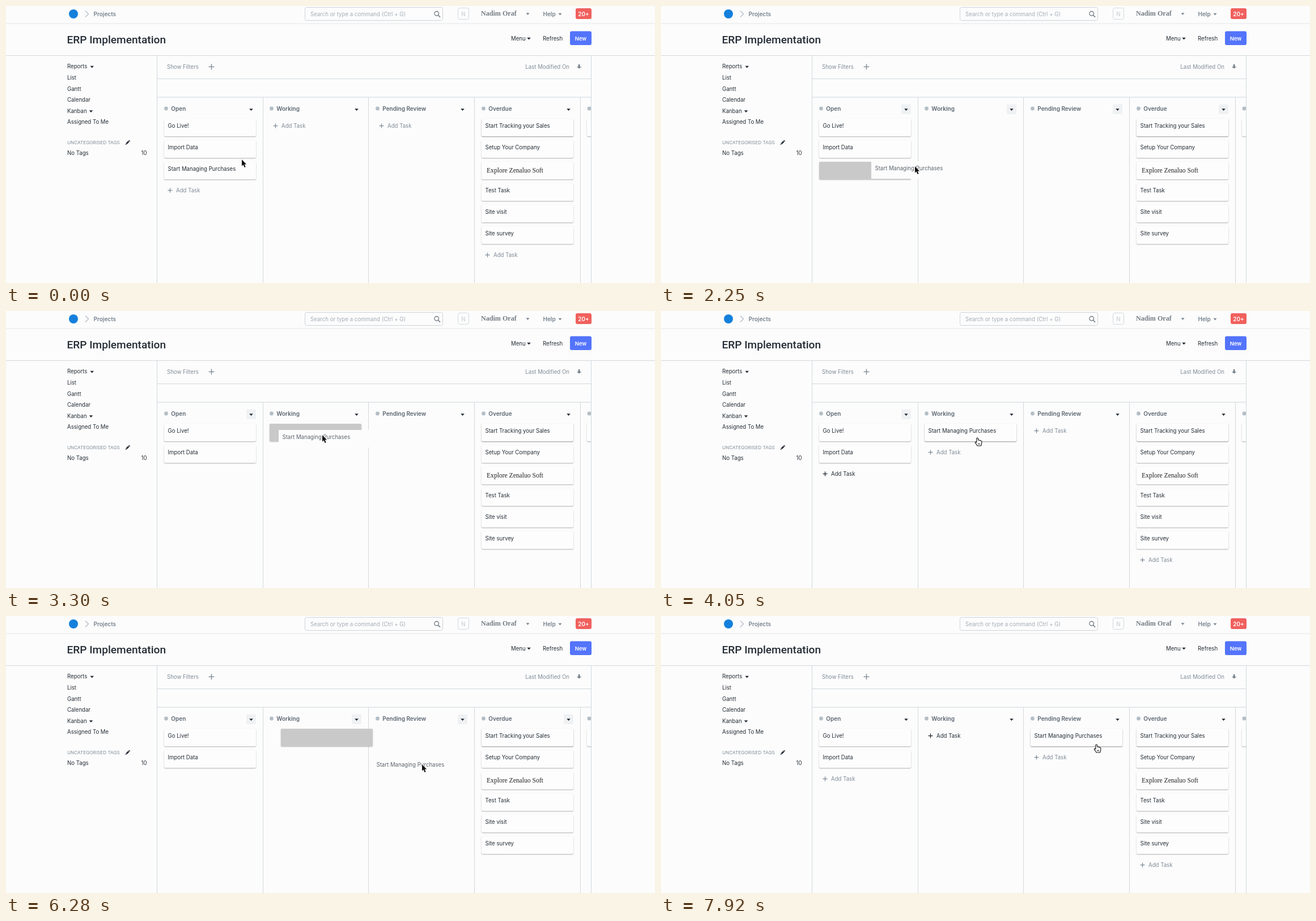
Recreate the animation shown at these times as an HTML page with a canvas. Size 1145 by 489 pixels, loop 8 s.

```html
<!DOCTYPE html>
<html lang="en">
<head>
<meta charset="utf-8">
<title>Kanban board</title>
<style>
  html, body { margin: 0; width: 100%; height: 100%; overflow: hidden; background: #fcfcfc; }
  canvas { display: block; width: 100vw; height: 100vh; }
</style>
</head>
<body>
<canvas id="stage"></canvas>
<script>
const W = 1145, H = 489, LOOP = 8000, STEP = 150;
const canvas = document.getElementById('stage');
const ctx = canvas.getContext('2d');
const scale = window.devicePixelRatio || 1;
canvas.width = Math.round(W * scale);
canvas.height = Math.round(H * scale);

const SANS = 'Inter, "Liberation Sans", sans-serif';
const SERIF = '"Liberation Serif", "Times New Roman", serif';
const BODY = `400 9.65px ${SANS}`;
const BOLD = `600 10px ${SANS}`;
const BG = '#fcfcfc', INK = '#242c35', MUTED = '#808c98', LINE = '#d1d8dd', HEAD = '#5a6570';

const CARD_W = 162, CARD_H = 31, COL_X = 278.8, COL_GAP = 186.6, ROW_Y = 199, ROW_GAP = 38;
const MOVED = 'Start Managing Purchases';
const COLUMNS = [
  { name: 'Open', cards: ['Go Live!', 'Import Data'] },
  { name: 'Working', cards: [] },
  { name: 'Pending Review', cards: [] },
  { name: 'Overdue', cards: ['Start Tracking your Sales', 'Setup Your Company', 'Explore Zenaluo Soft',
                             'Test Task', 'Site visit', 'Site survey'] }
];

// Screen updates come in bursts: [start, count]
const BURSTS = [[0, 1], [150, 4], [1200, 4], [1950, 7], [3000, 4], [4050, 4],
                [5090, 4], [5830, 7], [6880, 1], [7330, 1], [7920, 1]];

// Pointer way points: [time, x, y]
const PATH = [
  [0, 416, 271], [600, 376, 286], [1050, 376, 286], [1650, 355, 287], [1800, 355, 285],
  [2550, 498, 282], [2850, 538, 264], [3300, 558, 219], [3450, 558, 211], [3900, 558, 211],
  [4500, 557, 294], [4950, 557, 294], [5090, 557, 293], [5540, 553, 211], [5680, 553, 211],
  [6280, 734, 262], [6730, 720, 208], [7180, 720, 208], [7330, 718, 242],
  [7770, 718, 242], [7920, 768, 227]
];

const DRAGS = [
  { start: 1950, end: 3450, slide: 2380, from: [0, 2], to: [1, 0], dx: -77, dy: -9 },
  { start: 5830, end: 6880, slide: 6264, from: [1, 0], to: [2, 0], dx: -87, dy: -12 }
];

const clamp = v => Math.max(0, Math.min(1, v));
const mix = (a, b, k) => a + (b - a) * k;
const within = (t, a, b) => t >= a && t < b;
const colX = c => Math.round(COL_X + c * COL_GAP);
const rowY = r => ROW_Y + r * ROW_GAP;

function shownTime(t) {
  let shown = 0;
  for (const [start, count] of BURSTS) {
    if (t < start) break;
    shown = start + Math.min(count - 1, Math.floor((t - start) / STEP)) * STEP;
  }
  return shown;
}

function pointerAt(t) {
  for (let i = 1; i < PATH.length; i++) {
    const [t0, x0, y0] = PATH[i - 1], [t1, x1, y1] = PATH[i];
    if (t <= t1) {
      const k = clamp((t - t0) / (t1 - t0)), e = k * k * (3 - 2 * k);
      return [Math.round(mix(x0, x1, e)), Math.round(mix(y0, y1, e))];
    }
  }
  return PATH[PATH.length - 1].slice(1);
}

// Text is placed by the middle of its capitals, on a whole-pixel baseline
function text(str, x, y, color = INK, font = BODY, align = 'left') {
  ctx.font = font;
  ctx.fillStyle = color;
  ctx.textAlign = align;
  ctx.fillText(str, x, Math.round(y + 3.5));
}

function rect(x, y, w, h, color) {
  ctx.fillStyle = color;
  ctx.fillRect(x, y, w, h);
}

function box(x, y, w, h, r, fill, stroke) {
  ctx.beginPath();
  ctx.roundRect(x, y, w, h, r);
  if (fill) { ctx.fillStyle = fill; ctx.fill(); }
  if (stroke) { ctx.strokeStyle = stroke; ctx.lineWidth = 1; ctx.stroke(); }
}

function raisedBox(x, y, fill, shade) {
  ctx.save();
  ctx.shadowColor = `rgba(0,0,0,${shade})`;
  ctx.shadowBlur = 2 * scale;
  ctx.shadowOffsetY = scale;
  box(x, y, CARD_W, CARD_H, 2, fill);
  ctx.restore();
}

function dot(x, y, r, color) {
  ctx.fillStyle = color;
  ctx.beginPath();
  ctx.arc(x, y, r, 0, Math.PI * 2);
  ctx.fill();
}

function line(points, color, width) {
  ctx.strokeStyle = color;
  ctx.lineWidth = width;
  ctx.beginPath();
  points.forEach(([x, y]) => ctx.lineTo(x, y));
  ctx.stroke();
}

function caret(x, y, color = INK, half = 3.3) {
  ctx.fillStyle = color;
  ctx.beginPath();
  ctx.moveTo(x - half, y - 1.7);
  ctx.lineTo(x + half, y - 1.7);
  ctx.lineTo(x, y + 1.9);
  ctx.fill();
}

function plus(x, y, half, color, width) {
  line([[x - half, y], [x + half, y]], color, width);
  line([[x, y - half], [x, y + half]], color, width);
}

function card(x, y, label, hover) {
  raisedBox(x, y, '#fdfdfd', hover ? 0.42 : 0.3);
  if (!label) return;
  if (label.startsWith('Explore')) text(label, x + 9, y + 15, '#222', `11.6px ${SERIF}`);
  else text(label, x + 6.5, y + 12.5);
}

function addTask(col, row, dark) {
  const x = colX(col), y = rowY(row) + 12.5, color = dark ? INK : MUTED;
  plus(x + 10.5, y, 4, color, 1.3);
  text('Add Task', x + 21, y, color);
}

function navbar() {
  rect(0, 30.5, W, 1, '#e4e8eb');
  dot(119, 14, 8, '#1580dc');
  line([[140, 8.5], [145.5, 14], [140, 19.5]], '#b4bec8', 1.4);
  text('Projects', 154.5, 14.5, '#75818d', BOLD);

  box(527.5, 2.5, 243, 23, 3, null, '#cdd4d9');
  text('Search or type a command (Ctrl + G)', 537, 14.5, '#a3adb7');
  ctx.strokeStyle = '#6c7680';
  ctx.lineWidth = 1.3;
  ctx.beginPath();
  ctx.arc(759.7, 13.3, 3.8, 0, Math.PI * 2);
  ctx.stroke();
  line([[762.5, 16.2], [766, 19.8]], '#6c7680', 1.6);

  box(797.5, 3.5, 19, 20, 3, null, '#d1d8dd');
  text('N', 807, 14, '#c0c9d0', BODY, 'center');
  text('Nadim Oraf', 838, 13.5, '#757c84', `700 12.1px ${SERIF}`);
  caret(920.5, 14, '#7b8794', 3);
  text('Help', 947.5, 14, '#75818d', BOLD);
  caret(977.5, 14.5, '#7b8794', 3);
  box(1005, 4, 28, 19, 3, '#f0605d');
  text('20+', 1019, 14, '#fff', BOLD, 'center');
}

function pageHead() {
  ctx.font = '500 19.1px Roboto, "Liberation Sans", sans-serif';
  ctx.fillStyle = INK;
  ctx.textAlign = 'left';
  ctx.fillText('ERP Implementation', 107.5, 66);
  text('Menu', 891, 57);
  caret(922.5, 57.5);
  text('Refresh', 947, 57);
  box(995, 44.5, 38, 24.5, 3, '#5374fb');
  text('New', 1014, 57, '#fff', `600 9.5px ${SANS}`, 'center');
  rect(0, 87, W, 1, LINE);
}

function sidebar() {
  ['Reports', 'List', 'Gantt', 'Calendar', 'Kanban', 'Assigned To Me']
    .forEach((label, i) => text(label, 108, 106.9 + i * 19.6));
  caret(151.7, 107.5);
  caret(150, 186);
  text('UNCATEGORISED TAGS', 108, 240.7, MUTED, `400 8.2px ${SANS}`);
  line([[212.6, 243], [216.6, 239]], INK, 2.8);
  line([[217.1, 238.5], [218.2, 237.4]], INK, 2.8);
  line([[211, 244.6], [212.3, 243.3]], INK, 1.5);
  text('No Tags', 108, 259.5);
  text('10', 248.5, 259.5, INK, BODY, 'right');
}

function boardFrame() {
  rect(266, 87, 1, H, LINE);
  rect(1032, 87, 1, H, LINE);
  rect(267, 128, 765, 1, LINE);
  rect(267, 160.5, 765, 1, LINE);
  for (let c = 1; c < 5; c++) rect(Math.round(266.2 + c * COL_GAP), 161, 1, H, LINE);

  text('Show Filters', 284, 107.5, MUTED);
  plus(362.5, 107.3, 5, MUTED, 1.4);
  text('Last Modified On', 994, 107.5, MUTED, BODY, 'right');
  rect(1009.7, 103, 2.8, 4.5, '#76818d');
  caret(1011.1, 108.7, '#76818d', 4.2);
}

function board(t, [px, py]) {
  const drag = DRAGS.find(d => within(t, d.start, d.end));
  const allLit = within(t, 1950, 3000) || within(t, 5830, 6880);
  const home = t < 3450 ? [0, 2] : t < 6880 ? [1, 0] : [2, 0];

  COLUMNS.forEach(({ name, cards }, c) => {
    const x = colX(c);
    dot(x + 3.5, 181, 3.4, '#b4bec6');
    text(name, x + 12.3, 181, HEAD, BOLD);
    if (allLit || (c === 0 && within(t, 1950, 6880))) box(x + 145, 173.5, 17, 17.5, 2, '#eff1f3');
    caret(x + 153.5, 183);
    cards.forEach((label, r) => card(x, rowY(r), label, c === 3 && r === 0));
    const dark = (c === 0 && within(t, 3450, 7330)) || (c === 1 && t >= 6880);
    if (!drag) addTask(c, cards.length + (home[0] === c ? 1 : 0), dark);
  });

  ctx.save();
  ctx.beginPath();
  ctx.rect(1014, 161, 18, H);
  ctx.clip();
  dot(colX(4) + 4, 181, 3.4, '#b4bec6');
  card(colX(4), rowY(0));
  ctx.restore();

  if (drag) {
    const k = clamp((t - drag.slide) / STEP);
    const x = mix(colX(drag.from[0]), colX(drag.to[0]), k);
    const y = mix(rowY(drag.from[1]), rowY(drag.to[1]), k);
    raisedBox(x, y, '#c9c9c9', 0.25);
    const gx = px + drag.dx, gy = py + drag.dy;
    rect(gx, gy, CARD_W, CARD_H, BG);
    text(MOVED, gx + 6.5, gy + 12.5, '#5d646c');
    return false;
  }
  const x = colX(home[0]), y = rowY(home[1]);
  const hover = px >= x && px <= x + CARD_W && py >= y && py <= y + CARD_H;
  card(x, y, MOVED, hover);
  return hover;
}

const ARROW = new Path2D('M0 0V11.6L2.6 9.2 4.7 14 6.7 13.1 4.6 8.5H8.2Z');
const HAND = new Path2D('M-1.2 .8Q.2 -.8 1.5 .8V4Q3 3.2 4 4.5 5.5 4 6.3 5.2 8 5 8 7L7.5 10.5 6.5 14H0' +
  'Q-1 11.5 -3.5 8.8 -4 6.8 -2.2 7.2L-1.2 8.2ZM2 9.5V11.8M4 9.5V11.8');

function cursor([x, y], hand) {
  ctx.save();
  ctx.translate(x, y);
  ctx.lineJoin = 'round';
  ctx.lineWidth = hand ? 1.1 : 1.6;
  ctx.strokeStyle = hand ? '#111' : '#fff';
  ctx.fillStyle = hand ? '#fff' : '#111';
  const shape = hand ? HAND : ARROW;
  if (hand) { ctx.fill(shape); ctx.stroke(shape); }
  else { ctx.stroke(shape); ctx.fill(shape); }
  ctx.restore();
}

function draw(now) {
  const t = shownTime(now % LOOP);
  const pointer = pointerAt(t);
  ctx.setTransform(scale, 0, 0, scale, 0, 0);
  rect(0, 0, W, H, BG);
  navbar();
  pageHead();
  sidebar();
  boardFrame();
  const hand = board(t, pointer);
  cursor(pointer, hand);
}

const begin = performance.now();
function tick() {
  draw(performance.now() - begin);
  requestAnimationFrame(tick);
}
tick();
</script>
</body>
</html>
```
